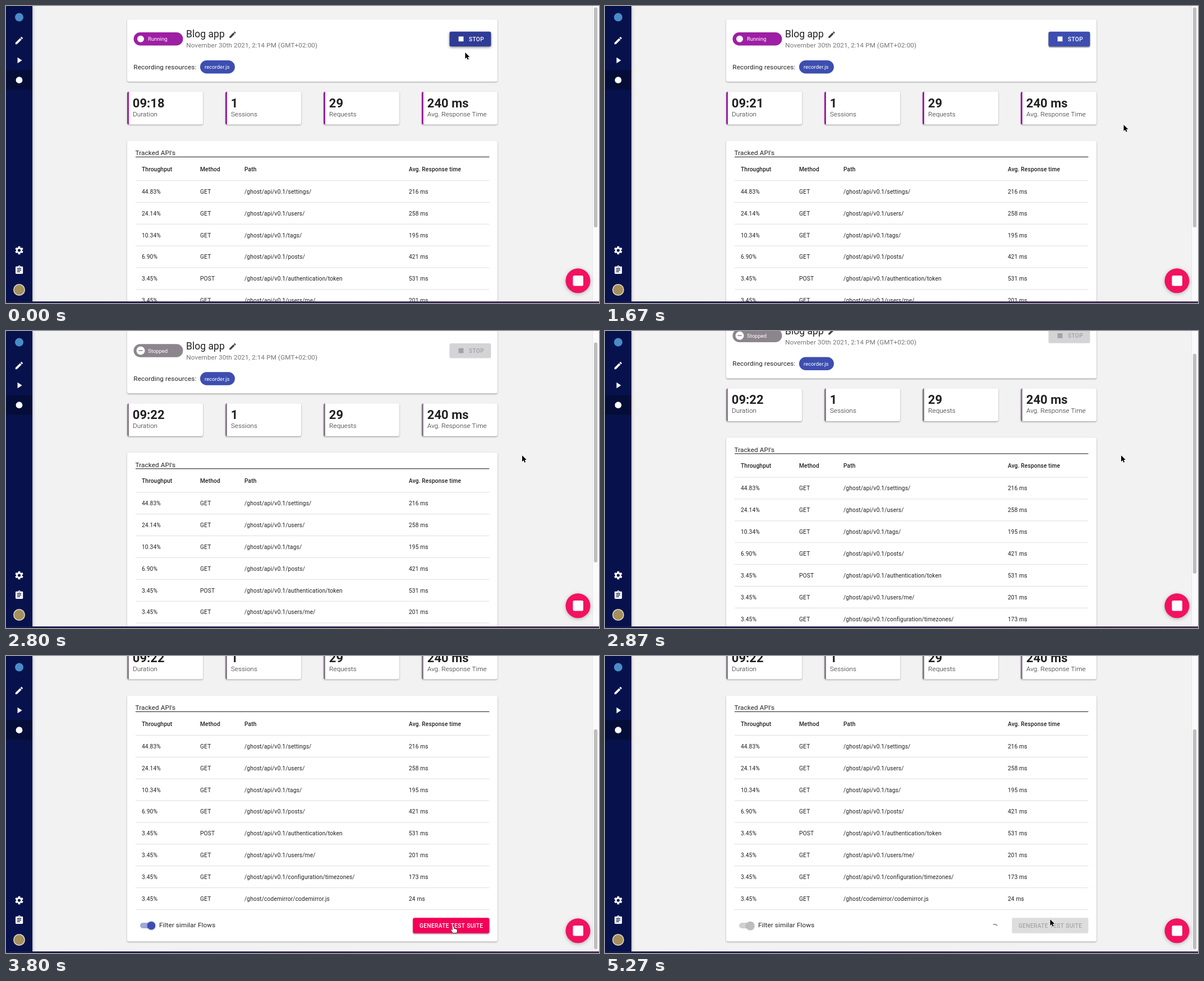
An HTML page with a canvas that plays this animation: 1057x530 px, repeating every 5340 ms.

```html
<!DOCTYPE html>
<html lang="en">
<head>
<meta charset="utf-8">
<title>Recording dashboard</title>
<style>
html, body { margin: 0; width: 100%; height: 100%; overflow: hidden; background: #f2f2f2; }
canvas { display: block; width: 1057px; height: 530px; }
</style>
</head>
<body>
<canvas id="stage"></canvas>
<script>
const W = 1057, H = 530, LOOP = 5340;
const canvas = document.getElementById('stage');
const ctx = canvas.getContext('2d');
const dpr = window.devicePixelRatio || 1;
canvas.width = W * dpr;
canvas.height = H * dpr;

// Times of the main events, in ms
const STOP_AT = 1750, SCROLL_FROM = 2670, SCROLL_TO = 3224, HOVER_AT = 3800, CLICK_AT = 4720;
const SCROLL_MAX = 170, ROW = 38.87;

const BODY = 11.73, SMALL = 10.26, CHIP = 9.53;
const INK = '#212121', NAVY = '#07124d';
const PURPLE = [157, 31, 163], GREY = [141, 133, 142], BLUE = [61, 78, 176];

const rows = [
  ['44.83%', 'GET', '/ghost/api/v0.1/settings/', '216 ms'],
  ['24.14%', 'GET', '/ghost/api/v0.1/users/', '258 ms'],
  ['10.34%', 'GET', '/ghost/api/v0.1/tags/', '195 ms'],
  ['6.90%', 'GET', '/ghost/api/v0.1/posts/', '421 ms'],
  ['3.45%', 'POST', '/ghost/api/v0.1/authentication/token', '531 ms'],
  ['3.45%', 'GET', '/ghost/api/v0.1/users/me/', '201 ms'],
  ['3.45%', 'GET', '/ghost/api/v0.1/configuration/timezones/', '173 ms'],
  ['3.45%', 'GET', '/ghost/codemirror/codemirror.js', '24 ms']
];
const columns = [242, 346, 425, 718];

// Pointer stops: time, x, y
const route = [
  [0, 818.5, 83], [40, 818.5, 83], [750, 890.5, 192], [900, 890.5, 192], [1500, 924.5, 212],
  [2220, 924.5, 212], [2400, 920, 222], [2930, 920, 222], [3370, 729.3, 418],
  [3450, 729.3, 418], [3850, 800, 485], [4850, 800, 485], [5200, 793.5, 470], [LOOP, 793.5, 470]
];

const pencil = new Path2D('M3 17.25V21h3.75L17.81 9.94l-3.75-3.75L3 17.25zM20.71 7.04c.39-.39.39-1.02 0-1.41l-2.34-2.34c-.39-.39-1.02-.39-1.41 0l-1.83 1.83 3.75 3.75 1.83-1.83z');
const play = new Path2D('M8 5v14l11-7z');
const arrow = new Path2D('M0 0V11.2L2.6 8.8 4.4 12.8 6.2 12 4.5 8.1H8z');
const hand = new Path2D('M-1.2 1Q0-.8 1.2 1V4.6Q2.4 3.8 3.2 5 4.6 4.4 5.2 5.6 7 5.2 7 7V9Q7 10.4 6 12H-.4Q-1.6 9.6-3.6 7.6-4 6-2.6 6.2L-1.2 7.4z');

const clamp = v => Math.max(0, Math.min(1, v));
const ramp = (t, from, to) => clamp((t - from) / (to - from));
const smooth = k => k * k * (3 - 2 * k);
const rgb = c => `rgb(${c.map(Math.round).join()})`;
const mix = (a, b, k) => rgb(a.map((v, i) => v + (b[i] - v) * k));

function text(str, x, y, size, color = INK, weight = 400, spacing = 0) {
  ctx.font = `${weight} ${size}px Roboto, Arial, sans-serif`;
  ctx.letterSpacing = spacing * size + 'px';
  ctx.fillStyle = color;
  ctx.fillText(str, x, y);
}
const body = (str, x, y, color) => text(str, x, y, BODY, color, 400, 0.0094);
const cell = (str, x, y, weight) => text(str, x, y, SMALL, INK, weight, 0.0107);

function box(x, y, w, h, r, fill) {
  ctx.beginPath();
  ctx.roundRect(x, y, w, h, r);
  ctx.fillStyle = fill;
  ctx.fill();
}

function disc(x, y, r, fill) {
  ctx.beginPath();
  ctx.arc(x, y, r, 0, 7);
  ctx.fillStyle = fill;
  ctx.fill();
}

function raised(blur, dy, alpha, draw) {
  ctx.save();
  ctx.shadowColor = `rgba(0,0,0,${alpha})`;
  ctx.shadowBlur = blur * dpr;
  ctx.shadowOffsetY = dy * dpr;
  draw();
  ctx.restore();
}

const card = (x, y, w, h) => raised(2.4, 1.1, 0.36, () => box(x, y, w, h, 3, '#fff'));

function icon(path, x, y, size, fill) {
  ctx.save();
  ctx.translate(x - size / 2, y - size / 2);
  ctx.scale(size / 24, size / 24);
  ctx.fillStyle = fill;
  ctx.fill(path);
  ctx.restore();
}

function header(t) {
  const stopped = t >= STOP_AT;
  const fade = ramp(t, STOP_AT, 2650);
  const chip = mix(PURPLE, GREY, stopped ? 0.25 + 0.75 * fade : 0);
  card(216, 24, 660, 111);
  box(227.5, 47, 88, 23.4, 11.7, chip);
  if (stopped) {
    disc(240, 58.7, 7.5, '#fff');
    ctx.fillStyle = chip;
    ctx.fillRect(236.3, 57.9, 7.4, 1.5);
  } else {
    disc(240, 58.7, 6, '#fff');
  }
  text(stopped ? 'Stopped' : 'Running', 253, 62.2, CHIP, '#fff');

  text('Blog app', 321, 56.2, 17.6);
  icon(pencil, 404, 51.3, 15.2, '#3f3f3f');
  body('November 30th 2021, 2:14 PM (GMT+02:00)', 321.3, 74.4, '#757575');
  body('Recording resources:', 227.3, 112.6);
  box(346, 97, 62, 23.4, 11.7, rgb(BLUE));
  text('recorder.js', 354, 112.2, CHIP, '#fff');

  let ink = '#fff';
  if (stopped) {
    box(790.5, 45.7, 74, 26.6, 3, mix([180, 176, 200], [212, 212, 214], smooth(fade)));
    ink = mix([150, 148, 160], [162, 162, 164], fade);
  } else {
    const leave = ramp(t, 40, 300);
    raised(4 - 2 * leave, 1.6, 0.45, () => box(790.5, 45.7, 74, 26.6, 3, mix([46, 60, 150], BLUE, leave)));
  }
  ctx.fillStyle = ink;
  ctx.fillRect(806.7, 54.4, 8.8, 8.8);
  text('STOP', 825, 62.6, SMALL, ink, 500, 0.0286);
}

function stats(t) {
  const seconds = 18 + [450, 950, 1380, STOP_AT].filter(s => t >= s).length;
  const list = [['09:' + seconds, 'Duration'], ['1', 'Sessions'], ['29', 'Requests'], ['240 ms', 'Avg. Response Time']];
  const top = ramp(t, 1800, 2850), low = ramp(t, 1800, 2200);
  list.forEach(([value, label], i) => {
    const x = 216 + i * 175;
    card(x, 153, 135, 58.5);
    const edge = ctx.createLinearGradient(0, 153, 0, 211);
    edge.addColorStop(0, mix(PURPLE, [145, 124, 147], top));
    edge.addColorStop(1, mix(PURPLE, [130, 126, 132], low));
    box(x, 153, 3, 58.5, [3, 0, 0, 3], edge);
    text(value, x + 9.8, 180.6, 22, INK, 700);
    text(label, x + 10.1, 196.8, BODY, INK, 300, 0.005);
  });
}

function rule(y, color, h) {
  ctx.fillStyle = color;
  ctx.fillRect(231, y, 630.5, h);
}

function table(t) {
  card(216, 240.8, 660, 438.7);
  body('Tracked API\'s', 230.5, 266.3);
  rule(268.8, '#3a3a3a', 1.2);
  ['Throughput', 'Method', 'Path', 'Avg. Response time'].forEach((s, i) => cell(s, columns[i], 294.5, 500));
  rule(311, '#dedede', 1);
  rows.forEach((r, n) => {
    r.forEach((s, i) => cell(s, columns[i], 334.8 + n * ROW, 400));
    rule(311 + (n + 1) * ROW, '#dedede', 1);
  });

  const off = t >= CLICK_AT;
  const dim = ramp(t, CLICK_AT, CLICK_AT + 180);
  box(239, 645.9, 25, 10.2, 5.1, mix([159, 168, 218], [208, 208, 208], dim));
  raised(2, 1, 0.35, () => disc(259, 651, 7.3, mix(BLUE, [189, 189, 189], dim)));
  body('Filter similar Flows', 273, 654.2);

  const hover = ramp(t, HOVER_AT, HOVER_AT + 180);
  const pink = [245 - 33 * hover, 14 * hover, 87 + 3 * hover];
  const face = mix(pink, [221, 221, 221], dim);
  const draw = () => box(725.3, 637.3, 136.2, 27.4, 3, face);
  if (off) draw(); else raised(2.5 + 2 * hover, 1.5, 0.4, draw);
  text('GENERATE TEST SUITE', 737, 654.6, SMALL, mix([255, 255, 255], [166, 166, 166], dim), 500, 0.0286);

  if (off) {
    const turn = (t - 5270) / 1400 * Math.PI * 2;
    ctx.beginPath();
    ctx.arc(694, 655, 6.3, turn - 1.95, turn - 0.6);
    ctx.lineWidth = 1.3;
    ctx.strokeStyle = '#6a6a6a';
    ctx.stroke();
  }
}

function gear(x, y) {
  ctx.save();
  ctx.translate(x, y);
  disc(0, 0, 5.4, '#fff');
  for (let i = 0; i < 6; i++) {
    ctx.rotate(Math.PI / 3);
    box(-1.9, -7.3, 3.8, 4, 0.6, '#fff');
  }
  disc(0, 0, 2.6, NAVY);
  ctx.restore();
}

function sidebar() {
  ctx.save();
  ctx.shadowColor = 'rgba(0,0,0,.4)';
  ctx.shadowBlur = 5 * dpr;
  ctx.fillStyle = NAVY;
  ctx.fillRect(0, 0, 47, H);
  ctx.restore();
  ctx.fillStyle = '#040c38';
  ctx.fillRect(0, 114.5, 47, 35);

  disc(23.5, 20, 7.5, '#4a8cc8');
  icon(pencil, 23.4, 61.7, 17.6, '#fff');
  icon(play, 23.5, 97, 17.6, '#fff');
  disc(23.5, 132.2, 5.9, '#fff');
  gear(23.5, 436);

  box(17, 464.7, 13.2, 13.2, 1.4, '#fff');
  disc(23.6, 465.2, 2.1, '#fff');
  disc(23.6, 465.4, 0.7, NAVY);
  ctx.fillStyle = NAVY;
  [7.3, 7.3, 5.1].forEach((w, i) => ctx.fillRect(19.9, 467.7 + i * 2.9, w, 1.4));

  disc(23.5, 506.5, 10.5, '#e6dcb8');
  disc(23.5, 506.5, 9, '#a48f5e');
}

function chrome(scroll) {
  ctx.fillStyle = '#fafafa';
  ctx.fillRect(1045, 0, 12, H);
  ctx.fillStyle = '#e6e6e6';
  ctx.fillRect(1045, 0, 1, H);
  box(1048, 2.5 + scroll * 0.755, 6.2, 392.5, 3.1, '#bebebe');
  sidebar();
  const strip = ctx.createLinearGradient(0, 0, W, 0);
  strip.addColorStop(0, '#171849');
  strip.addColorStop(1, '#40294f');
  ctx.fillStyle = strip;
  ctx.fillRect(0, 527.2, W, 3);
  raised(6, 1.5, 0.28, () => disc(1019.5, 490.3, 22, '#f2125f'));
  box(1010.5, 481, 18.5, 18.5, 2.5, '#fff');
}

function pointer(t) {
  const i = Math.max(1, route.findIndex(p => p[0] > t));
  const a = route[i - 1], b = route[i];
  const k = smooth(ramp(t, a[0], b[0]));
  const over = t >= HOVER_AT && t < 4850;
  const shape = over ? hand : arrow;
  ctx.save();
  ctx.translate(a[1] + (b[1] - a[1]) * k, a[2] + (b[2] - a[2]) * k);
  ctx.lineJoin = 'round';
  ctx.lineWidth = over ? 1 : 1.6;
  ctx.strokeStyle = over ? '#000' : '#fff';
  ctx.fillStyle = over ? '#fff' : '#000';
  ctx.stroke(shape);
  ctx.fill(shape);
  ctx.restore();
}

function draw(now) {
  const t = now % LOOP;
  const scroll = SCROLL_MAX * smooth(ramp(t, SCROLL_FROM, SCROLL_TO));
  ctx.setTransform(dpr, 0, 0, dpr, 0, 0);
  ctx.fillStyle = '#f2f2f2';
  ctx.fillRect(0, 0, W, H);
  ctx.save();
  ctx.translate(0, -scroll);
  header(t);
  stats(t);
  table(t);
  ctx.restore();
  chrome(scroll);
  pointer(t);
}

let start;
function tick(now) {
  start ??= now;
  draw(now - start);
  requestAnimationFrame(tick);
}
requestAnimationFrame(tick);
</script>
</body>
</html>
```
